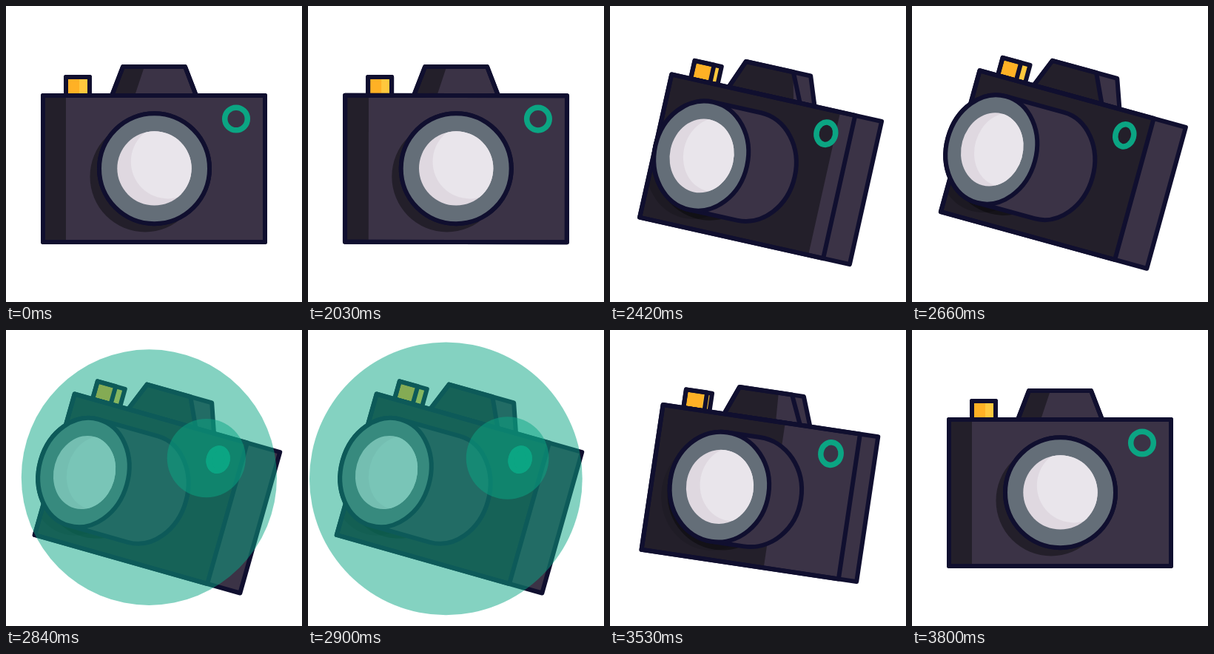
Animation, 400 px wide and 400 px high, one loop 3.83 s. Source, as an HTML page with a canvas:

```html
<!DOCTYPE html>
<html lang="en">
<head>
<meta charset="utf-8">
<title>Camera</title>
<style>
html, body { margin: 0; width: 100%; height: 100%; overflow: hidden; background: #fff; }
canvas { display: block; width: 100vw; height: 100vh; }
</style>
</head>
<body>
<canvas id="stage"></canvas>
<script>
const LOOP = 3830, TURN = 800, OUT = 2025, BACK = 2980;
const FLASH = 2690, PEAK = 2890, FLASH_END = 3090;
const INK = '#100f2f', BODY = '#3b3346', SHADE = 'rgba(0,0,0,.4)';
const GREEN = '#0ba583', ORANGE = '#ffb125', YELLOW = '#ffc83d';

const canvas = document.getElementById('stage');
const g = canvas.getContext('2d');
const clamp = v => Math.max(0, Math.min(1, v));
const mix = (a, b, t) => a + (b - a) * t;

function ease(x) {
  x = clamp(x);
  const bez = (a, b, u) => 3 * a * u * (1 - u) ** 2 + 3 * b * u * u * (1 - u) + u ** 3;
  let lo = 0, hi = 1;
  for (let i = 0; i < 24; i++) {
    const mid = (lo + hi) / 2;
    if (bez(0.25, 0.25, mid) < x) lo = mid; else hi = mid;
  }
  return bez(0.1, 1, lo);
}

function turnAt(t) {
  return t < BACK ? ease((t - OUT) / TURN) : ease((BACK + TURN - t) / TURN);
}

function flashAt(t) {
  const up = t < PEAK ? (t - FLASH) / (PEAK - FLASH) : (FLASH_END - t) / (FLASH_END - PEAK);
  return Math.sin(clamp(up) * Math.PI / 2);
}

function paint(fill, line, width = 6) {
  if (fill) { g.fillStyle = fill; g.fill(); }
  if (line) { g.strokeStyle = line; g.lineWidth = width; g.stroke(); }
}

function poly(points, fill, line) {
  g.beginPath();
  points.forEach(([x, y]) => g.lineTo(x, y));
  g.closePath();
  paint(fill, line);
}

function box(x1, y1, x2, y2, fill, line) {
  poly([[x1, y1], [x2, y1], [x2, y2], [x1, y2]], fill, line);
}

function oval(x, y, rx, ry, fill, line, width) {
  g.beginPath();
  g.ellipse(x, y, rx, ry, 0, 0, Math.PI * 2);
  paint(fill, line, width);
}

function drawHump(k) {
  const top = -138, low = -99;
  const tl = -42 - 11.5 * k, bl = -57 - 12 * k;
  const tr = 42 - 4.5 * k, br = 57 - 5.5 * k;
  const et = 42 - 34.5 * k, eb = 57 - 31 * k;
  const st = Math.min(et, -13 + 34 * k), sb = Math.min(eb, -26 + 62 * k);
  const shape = [[tl, top], [tr, top], [br, low], [bl, low]];
  poly(shape, BODY);
  poly([[tl, top], [st, top], [sb, low], [bl, low]], SHADE);
  poly([[tl, top], [et, top], [eb, low], [bl, low]], null, INK);
  poly(shape, null, INK);
}

function drawButton(k) {
  const top = -124, low = -99, left = -119;
  const right = -87 + 6.5 * k, edge = -87 - 6.5 * k;
  box(left, top, right, low, YELLOW);
  box(left, top, Math.min(edge, -101 + 12 * k), low, ORANGE);
  box(left, top, edge, low, null, INK);
  box(left, top, right, low, null, INK);
}

function drawBody(k) {
  const w = 150 - 5.75 * k, h = 99;
  const edge = w - 46 * k;
  box(-w, -h, w, h, BODY);
  box(-w, -h, Math.min(edge, -w + 31 + 254 * k), h, SHADE);

  // shadow cast by the lens
  g.save();
  g.beginPath();
  g.rect(-w, -h, w + edge, 2 * h);
  g.clip();
  oval(-12 - 95 * k, 12, 74.5 - 10 * k, 75, `rgba(0,0,0,${0.2 * k})`);
  oval(-12 - 70 * k, 10.5 - 2 * k, 74.5, 75, SHADE);
  g.restore();

  box(-w, -h, edge, h, null, INK);
  box(-w, -h, w, h, null, INK);
}

function drawLens(k) {
  const x = 0.5 - 104 * k, base = 0.5 - 21 * k, y = -0.3;
  const rx = 74.5 - 14 * k, ry = 74.5, q = Math.PI / 2;
  g.beginPath();
  g.ellipse(base, y, rx, ry, 0, -q, q);
  g.ellipse(x, y, rx, ry, 0, q, 3 * q);
  g.closePath();
  paint(BODY, INK);
  oval(x, y, rx, ry, '#646e78', INK);

  const gx = 50.2 - 8.8 * k, cx = x + k;
  oval(cx, y - 0.3, gx, 50.2, '#dfd8e0');
  g.save();
  g.clip();
  oval(cx + 18.5 - k, y - 9.5 + 5 * k, gx, 50.2, '#e9e5eb');
  g.restore();
}

function drawRing(k, fill) {
  oval(111 - 44.5 * k, -67.5 + k, 15.3 - 3.1 * k, 15.3, fill, GREEN, 7.5);
}

function glow(x, y, r, f) {
  g.globalAlpha = 0.5;
  oval(mix(287, x, f), mix(175, y, f), mix(16, r, f), mix(18, r, f), GREEN);
  g.globalAlpha = 1;
}

function pose(k) {
  g.translate(200 + 4.5 * k, 220 + k);
  g.rotate(15.8 * k * Math.PI / 180);
}

function draw(t) {
  const k = turnAt(t), f = flashAt(t);
  g.setTransform(canvas.width / 400, 0, 0, canvas.height / 400, 0, 0);
  g.fillStyle = '#fff';
  g.fillRect(0, 0, 400, 400);
  g.lineJoin = 'round';

  g.save();
  pose(k);
  drawHump(k);
  drawButton(k);
  drawBody(k);
  drawLens(k);
  drawRing(k);
  g.restore();

  if (f > 0) {
    glow(186, 201, 185, f);
    glow(269.5, 173, 56, f);
    g.save();
    pose(k);
    drawRing(k, GREEN);
    g.restore();
  }
}

function resize() {
  const d = window.devicePixelRatio || 1;
  canvas.width = Math.round(innerWidth * d);
  canvas.height = Math.round(innerHeight * d);
}

resize();
addEventListener('resize', resize);
const start = performance.now();
function frame() {
  draw((performance.now() - start) % LOOP);
  requestAnimationFrame(frame);
}
frame();
</script>
</body>
</html>
```
